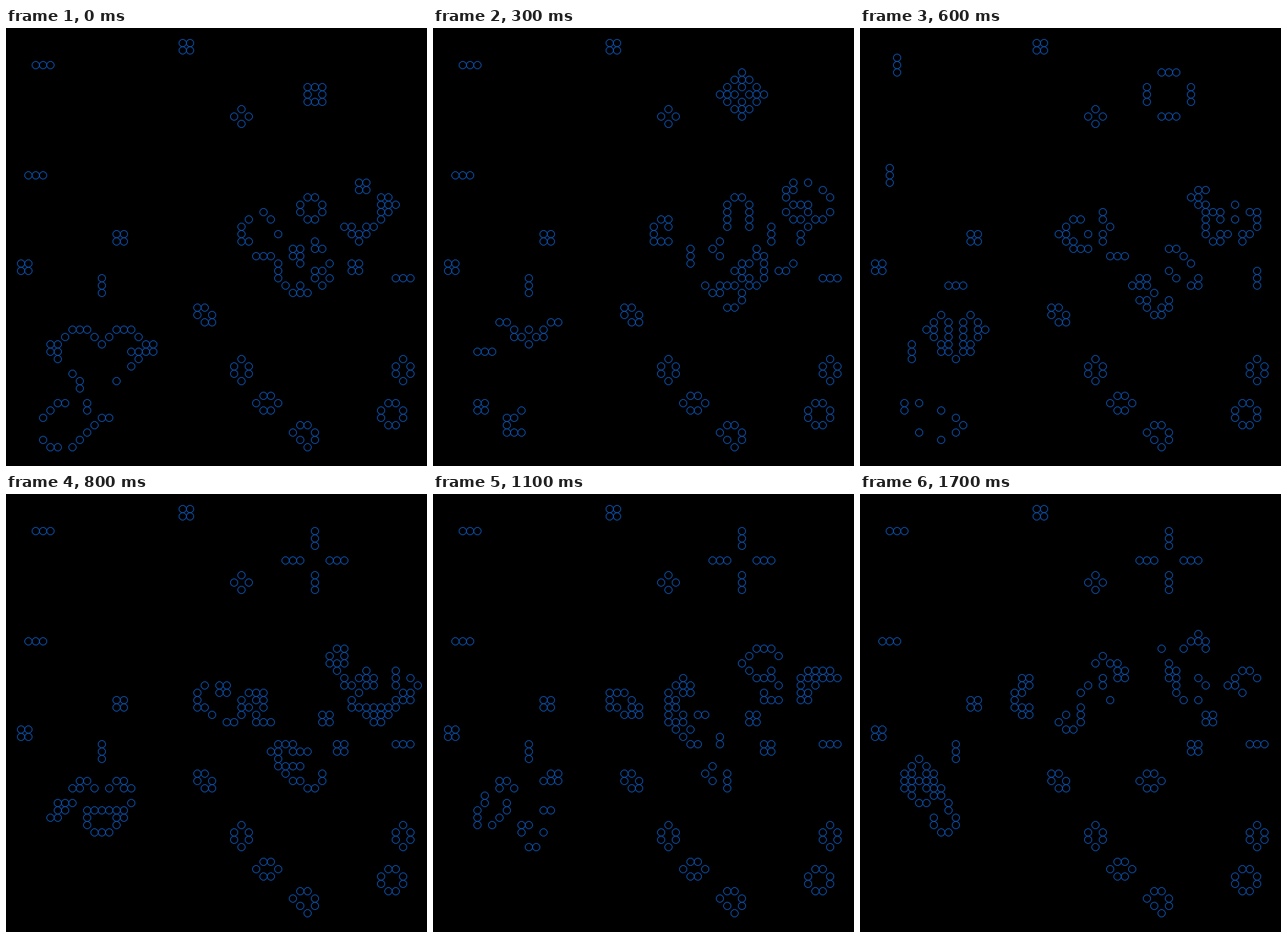
These frames come from a looping animation (573 by 596 pixels, 1.8 s). An HTML page with a canvas:

```html
<!DOCTYPE html>
<html lang="en">
<head>
<meta charset="utf-8">
<title>Game of Life</title>
<style>
  html, body { margin: 0; height: 100%; overflow: hidden; background: #000; }
  canvas { display: block; }
</style>
</head>
<body>
<canvas width="573" height="596"></canvas>
<script>
const COLS = 60, ROWS = 62, CELL = 10;
const FRAME_MS = 100, FRAMES = 18;
const GENS_PER_FRAME = 1.52, GEN_PHASE = 0.22;

const ctx = document.querySelector('canvas').getContext('2d');
const index = (x, y) => y * COLS + x;

const seed = new Uint8Array(COLS * ROWS);

// Stamps a drawing (rows split by whitespace) at each given top-left cell.
function place(drawing, ...corners) {
  const rows = drawing.trim().split(/\s+/);
  for (const [left, top] of corners)
    rows.forEach((row, y) => [...row].forEach((mark, x) => {
      if (mark === 'O') seed[index(left + x, top + y)] = 1;
    }));
}

// Still lifes
place('OO OO', [24, 2], [48, 21], [15, 28], [2, 32], [47, 32]);
place('.O. O.O .O.', [31, 11]);
place('.O. O.O O.O .O.', [31, 45], [53, 45]);
place('.OO. O..O .OO.', [34, 50]);
place('.OO. O..O O..O .OO.', [40, 23], [51, 51]);
place('OO. O.O .OO', [26, 38]);
place('.OO. O..O .O.O ..O.', [39, 54]);

// Blinkers, and the ring that grows into four of them
place('OOO', [4, 5], [3, 20], [53, 34]);
place('O O O', [13, 34]);
place('OOO O.O OOO', [41, 8]);

// Active clusters
place(`
  .....OO.
  .....OOO
  .....OO.
  .....O..
  OO.OO...
  .OOO....
  ..O.....`, [46, 23]);

place(`
  ...O.........
  .O..O........
  O............
  O....O.......
  OO........O..
  .......OO.OO.
  ..OOO..OO....
  .....O..O...O
  .....O....OO.
  .....O....O.O
  ......O.O..O.
  .......OOO...`, [32, 25]);

place(`
  ....OOO...OOO...
  ...O...O.O...O..
  .OO.....O.....OO
  .OO.........OOOO
  ..O..........O..
  ............O...
  ....O...........
  .....O....O.....
  .....O..........
  ................
  ..OO..O.........
  .O....O.........
  O.......OO......
  .......O........
  ......O.........
  O....O..........
  .OO.O...........`, [5, 41]);

function evolve(cells) {
  const next = new Uint8Array(cells.length);
  for (let y = 1; y < ROWS - 1; y++)
    for (let x = 1; x < COLS - 1; x++) {
      const i = index(x, y);
      let sum = -cells[i];
      for (let dy = -1; dy <= 1; dy++)
        for (let dx = -1; dx <= 1; dx++) sum += cells[index(x + dx, y + dy)];
      next[i] = sum === 3 || (sum === 2 && cells[i]) ? 1 : 0;
    }
  return next;
}

const generationAt = frame => Math.floor(frame * GENS_PER_FRAME + GEN_PHASE);

const generations = [seed];
while (generations.length <= generationAt(FRAMES - 1))
  generations.push(evolve(generations[generations.length - 1]));

function draw(cells) {
  ctx.fillStyle = '#000';
  ctx.fillRect(0, 0, 573, 596);
  ctx.strokeStyle = '#0f6ae0';
  ctx.lineWidth = 1;
  cells.forEach((alive, i) => {
    if (!alive) return;
    ctx.beginPath();
    ctx.arc((i % COLS) * CELL + 0.5, Math.floor(i / COLS) * CELL + 0.5, 5, 0, 2 * Math.PI);
    ctx.stroke();
  });
}

const start = performance.now();
function tick() {
  const frame = Math.floor((performance.now() - start) / FRAME_MS) % FRAMES;
  draw(generations[generationAt(frame)]);
  requestAnimationFrame(tick);
}
tick();
</script>
</body>
</html>
```
